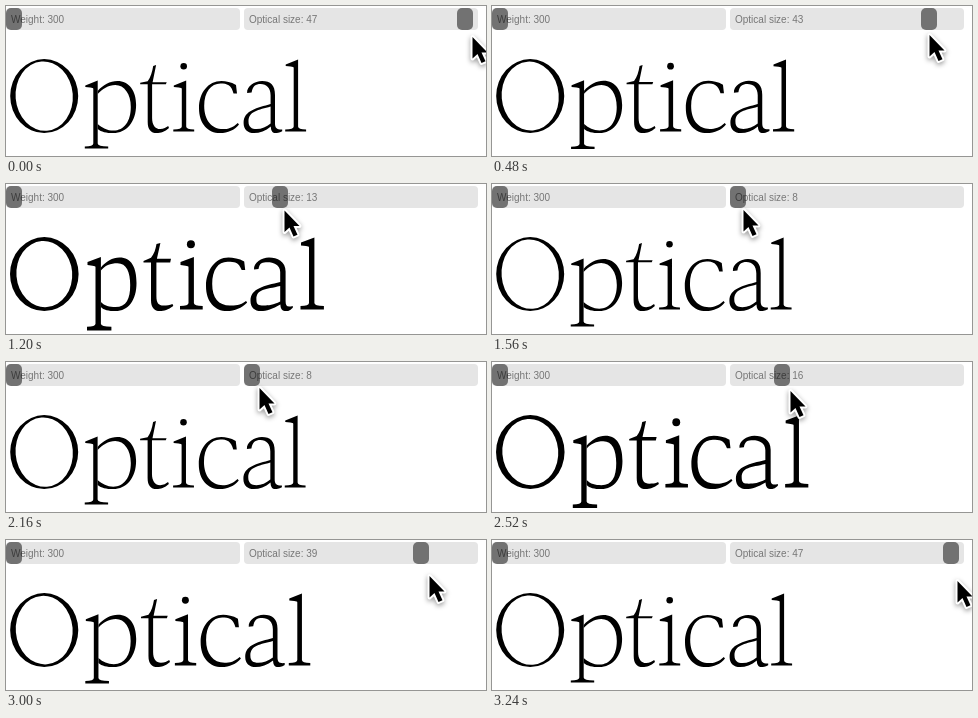
These frames come from a looping animation (480x150 px, 3360 ms). An HTML page with a canvas:

```html
<!DOCTYPE html>
<html lang="en">
<head>
<meta charset="utf-8">
<title>Optical size</title>
<style>
  html, body { margin: 0; width: 480px; height: 150px; overflow: hidden; background: #fff; }
  canvas { display: block; }
</style>
</head>
<body>
<canvas id="stage" width="480" height="150" role="img" aria-label="Optical"></canvas>
<script>
const ctx = document.getElementById('stage').getContext('2d');
const LOOP = 3360, STEP = 120;
const MIN = 8, MAX = 48;
const BASE = 125.5;

// time, optical size, pointer x, pointer y
const KEYS = [
  [0, 47, 466, 28],
  [240, 46, 459, 27.5],
  [480, 42.5, 437, 26],
  [720, 36, 401, 25],
  [1200, 13, 278, 23.5],
  [1320, 10, 262, 23],
  [1560, 8, 251, 23],
  [2040, 8, 251, 23],
  [2160, 8, 253, 23],
  [2280, 9, 260, 23.5],
  [2520, 16, 298, 26],
  [3000, 39, 423, 33],
  [3240, 47, 465, 38],
  [LOOP, 47, 465, 38]
];

const mix = (a, b, k) => a + (b - a) * k;

function poseAt(time) {
  const i = KEYS.findIndex(key => key[0] > time);
  const a = KEYS[i - 1], b = KEYS[i];
  const k = (time - a[0]) / (b[0] - a[0]);
  return [1, 2, 3].map(n => mix(a[n], b[n], k));
}

function roundBox(x, y, w, h, r, color) {
  ctx.fillStyle = color;
  ctx.beginPath();
  ctx.roundRect(x, y, w, h, r);
  ctx.fill();
}

function slider(x, label, ratio) {
  roundBox(x, 2, 234, 22, 4, '#e5e5e5');
  ctx.fillStyle = '#777';
  ctx.font = '10px "Liberation Sans", Arial, sans-serif';
  ctx.fillText(label, x + 5, 17);
  roundBox(x + Math.ceil(ratio * 218), 2, 16, 22, 5, 'rgba(0,0,0,.5)');
}

// Letterforms run from the fine display cut (k = 0) to the sturdy text cut (k = 1).
function drawWord(size) {
  const k = (47 - size) / 34;
  const at = (a, b) => mix(a, b, k);
  const s = at(4.4, 5.4);      // stem
  const h = at(2, 3.6);        // hairline and serif
  const top = at(75, 73.6);    // x-height
  const wide = at(0, 3);
  const low = BASE + 1.6;      // round overshoot

  function fill(path, x = 0) {
    ctx.save();
    ctx.translate(x, 0);
    ctx.fill(new Path2D(path), 'evenodd');
    ctx.restore();
  }

  const stem = (y, foot, right) => `M-8 ${y + 5} L${s} ${y}
    V${foot - h - 3} q0 3 ${right} 3 v${h} H-8.5 v${-h} q8.5 0 8.5 -3
    V${y + 6.5 + h} Q0 ${y + 5 + h} -3 ${y + 5 + h} L-8 ${y + 5 + h * .8}Z`;

  function letterO() {
    const rx = at(34, 34.3), cx = at(38.2, 38.3);
    ctx.beginPath();
    ctx.ellipse(cx, 90.1, rx, 37, 0, 0, Math.PI * 2);
    ctx.ellipse(cx, 90.1, rx - s - 1, 37 - h - .3, -.08, 0, Math.PI * 2);
    ctx.fill('evenodd');
  }

  function letterP() {
    const x = at(87.3, 89.5);
    const r = at(42.8, 41), inner = r - s - .9;
    fill(stem(top - .5, at(142.6, 146.4), 10.5), x);
    fill(`M${s} ${top + 10} C${s + 5} ${top + 4} 17 ${top} 24 ${top}
      C36 ${top} ${r} ${top + 10} ${r} 99 C${r} 116 33 ${low} 20 ${low}
      C13 ${low} 8 126 ${s} 123 V118
      C9 122 14 ${low - h - .5} 20 ${low - h - .5}
      C31 ${low - h - .5} ${inner} 115 ${inner} 101
      C${inner} 88 31 ${top + h + 2} 22 ${top + h + 2}
      C15 ${top + h + 2} 9 ${top + 8} ${s} ${top + 13}Z`, x);
  }

  // The top of the stem leans right into a pointed spur.
  function letterT() {
    const bar = top + 1.2, end = at(21, 22);
    fill(`M-7.5 ${bar + h - 1.5} L0 ${bar - 1} C3 ${bar - 5} 4.5 66 5.5 60 L${s + 4} 59
      L${s + .5} ${bar} H${end - 2} l-.8 ${h} H${s}
      V112 C${s} 119 7.5 ${low - h - 2} 12.5 ${low - h - 2}
      C16 ${low - h - 2} 18.5 121.5 ${end - .5} 120 l.8 2
      C17 126 13 ${low} 9 ${low} C3 ${low} 0 123.5 0 116
      V${bar + h} H-7.5Z`, at(141.7, 145));
  }

  function letterI() {
    const x = at(175.8, 182.5);
    fill(stem(top - .5, BASE, at(8, 8.8)), x);
    ctx.beginPath();
    ctx.arc(x + s / 2 - .3, 60.2, at(3.3, 4), 0, Math.PI * 2);
    ctx.fill();
  }

  function letterC() {
    const e = wide * .4, side = s + .8;
    fill(`M${38 + e} ${top + 12.5} L${37 + e} ${top + 4}
      C${32 + e} ${top + 1} 27 ${top} 22.5 ${top}
      C9 ${top} 0 87 0 102 C0 118 9 ${low} 21 ${low}
      C29 ${low} 35.5 124 ${40 + e} 118.5 l-1.2 -1.6
      C34 121.5 29 ${low - h - 2} 24 ${low - h - 2}
      C12.5 ${low - h - 2} ${side} 114 ${side} 100
      C${side} 86 12 ${top + h + .5} 21.5 ${top + h + .5}
      C28 ${top + h + .5} 32.5 ${top + 4} ${34.5 + e} ${top + 12.5}Z`, at(193, 200));
  }

  function letterA() {
    const x = 27 + wide * .9, r = x + s;
    fill(`M3.5 ${top + 12} C3 ${top + 5} 11 ${top} 18.5 ${top}
      C27 ${top} ${r} ${top + 4} ${r} ${top + 14}
      V117 C${r} 122 ${r + 1.5} 123.6 ${r + 7.2} ${BASE - h} v1.8
      C${r + 4} 127 ${r + 2} ${low} ${r + .5} ${low}
      C${x + 2} ${low} ${x + .3} 125 ${x + .2} 120.5
      C22 125 16 ${low} 10.5 ${low} C4 ${low} 0 123.5 0 117
      C0 104 14 102 ${x} 98 V${top + 14.5}
      C${x} ${top + 7} 23 ${top + h + 1} 17 ${top + h + 1}
      C12 ${top + h + 1} 9 ${top + 5} 8 ${top + 11.5}Z
      M${x} ${98.5 + h} C15 ${102 + h} ${s + .5} 105 ${s + .5} 115.5
      C${s + .5} 121 8 ${low - h - 2} 13 ${low - h - 2}
      C18 ${low - h - 2} 23 121 ${x} 117.5Z`, at(237.6, 244.5));
  }

  ctx.fillStyle = '#000';
  letterO();
  letterP();
  letterT();
  letterI();
  letterC();
  letterA();
  fill(stem(53.5, BASE, at(8, 9.5)), at(287.7, 303));
}

const arrow = new Path2D('M0 0 V21.5 L5 17 L9 26 L13 24.2 L9 15.5 H15Z');

function pointer(x, y) {
  ctx.save();
  ctx.translate(x + .5, y + 3);
  ctx.lineJoin = 'round';
  ctx.lineWidth = 4;
  ctx.strokeStyle = '#fff';
  ctx.shadowColor = 'rgba(0,0,0,.4)';
  ctx.shadowBlur = 5;
  ctx.shadowOffsetY = 2;
  ctx.stroke(arrow);
  ctx.shadowColor = 'transparent';
  ctx.fillStyle = '#000';
  ctx.fill(arrow);
  ctx.restore();
}

function draw(now) {
  const time = Math.floor(now % LOOP / STEP) * STEP;
  const [value, x, y] = poseAt(time);
  const size = Math.round(value);
  ctx.fillStyle = '#fff';
  ctx.fillRect(0, 0, 480, 150);
  slider(0, 'Weight: 300', 0);
  slider(238, `Optical size: ${size}`, (size - MIN) / (MAX - MIN));
  // The minimum falls back to the automatic display cut.
  drawWord(size === MIN ? MAX : size);
  pointer(x, y);
}

const start = performance.now();
function tick() {
  draw(performance.now() - start);
  requestAnimationFrame(tick);
}
tick();
</script>
</body>
</html>
```
